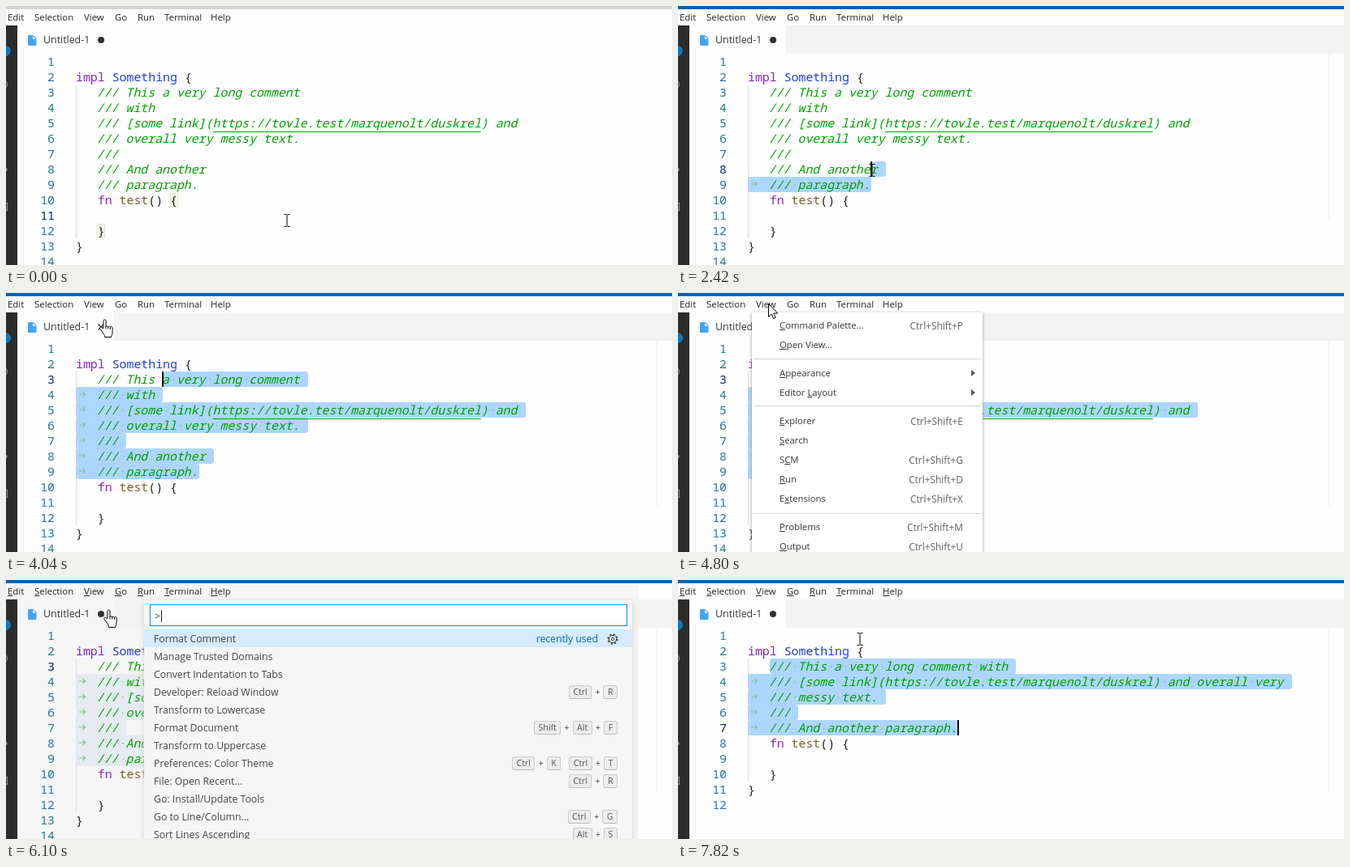
An HTML page for the animation above (8000 ms loop, 820 px wide and 320 px high).

```html
<!DOCTYPE html>
<html lang="en">
<head>
<meta charset="utf-8">
<title>Reflowing a comment</title>
<style>
html, body { margin: 0; width: 820px; height: 320px; overflow: hidden; background: #fefefe; }
body { position: relative; font: 12.25px/22px "Open Sans", "Noto Sans", sans-serif; color: #333; }
div, svg { position: absolute; }
div { white-space: pre; box-sizing: border-box; }
u { text-decoration: none; }

#title { width: 820px; height: 4px; background: #0063b1; }
.idle #title { background: #d4d4d4; }
#shade { top: 4px; width: 779px; height: 316px; background: #f6f6f6; }
#bar { top: 4px; font-size: 11.4px; line-height: 20px; color: #222; }
.alt #bar u, #menu u { text-decoration: underline; text-underline-offset: 1px; }
#lit { left: 90px; top: 4px; width: 38px; height: 19px; background: #e5e5e5; }
#side { left: 0; top: 24px; }
#strip { left: 133px; top: 24px; width: 687px; height: 35px; background: #f3f3f3; }
.idle #strip, .idle #ruler { display: none; }
#tab { left: 46px; top: 25px; line-height: 34px; font-size: 12.4px; }
#icons { left: 0; top: 24px; }
#cross, .close #dot { display: none; }
.close #cross { display: inline; }
#ruler { left: 801px; top: 59px; width: 1px; height: 205px; background: #f0f0f0; }

#code, #code div { font: 14.88px/19px "Noto Sans Mono", "DejaVu Sans Mono", monospace; }
#code { left: 86px; top: 59px; color: #222; }
#code .num { left: -76px; width: 50px; text-align: right; color: #237893; }
#code .now { color: #0b216f; }
#code .sel { height: 19px; border-radius: 3px; background: #add6ff; color: #8fc78f; }
.palette #code .sel { background: #e5ebf1; }
#code .sel svg { left: 4px; top: 5px; fill: none; stroke: #80c888; stroke-width: 1.2; }
#code .guide { left: 0; top: 38px; width: 1px; background: #dcdcdc; }
.pair { width: 10px; height: 18px; border: 1px solid #e2e5cf; background: #f5f8ea; display: none; }
.idle .pair { display: block; }
#code .cursor { width: 2px; height: 19px; background: #000; display: none; }
.caret #code .cursor { display: block; }
i { color: #00a000; position: relative; left: -1px; }
i u { text-decoration: underline 1px; text-underline-offset: 5px; text-decoration-skip-ink: none; }
.kw { color: #8424bd; }
.type { color: #1f3fd0; }
.fn { color: #795e26; }

#menu, #palette, #lit, #shade { display: none; }
.menu #menu, .palette #palette, .palette #shade, .lit #lit { display: block; }
#menu { left: 91px; top: 24px; width: 284px; height: 310px; background: #fff; box-shadow: 0 1px 4px #999; font-size: 11.3px; line-height: 24px; }
#menu .item { width: 283px; height: 24px; padding-left: 34px; }
#menu .key { right: 23px; top: 0; font-size: 11.9px; color: #606060; }
#menu .more { right: 8px; top: 8px; border: solid transparent; border-width: 4px 0 4px 5px; border-left-color: #555; }
#menu .rule { left: 2px; width: 280px; height: 1px; background: #d4d4d4; }
.item1 #menu .item:first-child, .item1 #menu .item:first-child .key { background: #0074e8; color: #fff; }

#palette { left: 170px; top: 25px; width: 601px; height: 310px; background: #f6f6f6; box-shadow: 0 1px 7px #d2d2d2; color: #444; }
#field { left: 7px; top: 5px; width: 588px; height: 27px; border: 1px solid #0090f1; background: #fff; padding-left: 5px; line-height: 27px; }
.blur #field { border-color: #fff; }
#blink { left: 13px; top: 6px; width: 1px; height: 15px; background: #222; display: none; }
.type-on #blink { display: block; }
.row { width: 601px; height: 22px; padding-left: 12px; line-height: 24px; }
.row.first { background: #d6ebff; }
.recent { right: 42px; top: 0; color: #0062b8; }
.keys { right: 18px; top: 2px; display: flex; align-items: center; height: 18px; font-size: 11px; line-height: 20px; }
kbd { font: 10.6px/15px "Open Sans", "Noto Sans", sans-serif; min-width: 6px; padding: 0 4.5px; text-align: center; border: 1px solid #ccc; border-bottom-color: #bbb; border-radius: 3px; background: #ececec; color: #555; }
.plus { margin: 0 4px; }
.gap { width: 10px; }
#gear { left: 570px; top: 41px; }

#pointer { left: 0; top: 0; pointer-events: none; }
#shape { fill: #fff; stroke: #000; }
</style>
</head>
<body>
<div id="shade"></div>
<div id="title"></div>
<div id="lit"></div>
<div id="bar"></div>
<svg id="side" width="14" height="296">
  <path fill="#2c2c2c" d="M0 0h14v296H0z"/>
  <path fill="#5a2a2a" d="M0 14h1v8H0z"/>
  <circle cx="-.5" cy="31.500" r="6.500" fill="#007acc"/>
  <g fill="none" stroke="#858585" stroke-width="1.3"><circle cx="-3" cy="73" r="4.600"/><path d="M-1 175l2.500 3-2.500 3M-3 219.500h4.500v9H-3"/></g>
</svg>
<div id="strip"></div>
<div id="tab">Untitled-1</div>
<svg id="icons" width="133" height="35">
  <path transform="translate(27 12)" fill="#42a5f5" d="M0 1.200Q0 0 1.200 0H6.500l4 4v7.800q0 1.200-1.200 1.200H1.200Q0 13 0 11.800z"/>
  <path fill="#fff" d="M33 13v3.700h3.700z"/>
  <circle id="dot" cx="117" cy="18" r="4" fill="#333"/>
  <path id="cross" d="M113.500 14.500l7 7m0-7l-7 7" stroke="#333" stroke-width="1.2"/>
</svg>
<div id="ruler"></div>
<div class="pair" style="left:202px;top:231px"></div>
<div class="pair" style="left:112px;top:269px"></div>
<div id="code"></div>
<div id="menu"></div>
<div id="palette">
  <div id="field">&gt;<div id="blink"></div></div>
</div>
<svg id="pointer" width="820" height="320"><path id="shape"/></svg>

<script>
const $ = id => document.getElementById(id);
const CHAR = 8.928, LINE = 19, LOOP = 8000;
const box = (cls, x, y, body = '', extra = '') =>
  `<div class="${cls}" style="left:${x}px;top:${y}px;${extra}">${body}</div>`;
const mnemonic = s => s.replace(/&(.)/, '<u>$1</u>');

// Menu bar
$('bar').innerHTML = [['&Edit', 2], ['&Selection', 35], ['&View', 96], ['&Go', 134],
  ['&Run', 162], ['&Terminal', 195], ['&Help', 252]]
  .map(([name, x]) => box('', x, 0, mnemonic(name))).join('');

// View menu: label, centre line, shortcut
$('menu').innerHTML = [['&Command Palette...', 40, 'Ctrl+Shift+P'], ['&Open View...', 64],
  ['&Appearance', 99, '>'], ['Editor &Layout', 123, '>'], ['&Explorer', 158, 'Ctrl+Shift+E'],
  ['&Search', 182], ['S&CM', 206, 'Ctrl+Shift+G'], ['&Run', 230, 'Ctrl+Shift+D'],
  ['E&xtensions', 254, 'Ctrl+Shift+X'], ['&Problems', 289, 'Ctrl+Shift+M'], ['&Output', 313, 'Ctrl+Shift+U']]
  .map(([name, y, key]) => box('item', 0, y - 36, mnemonic(name) +
    (key === '>' ? '<div class="more"></div>' : key ? `<div class="key">${key}</div>` : ''))).join('') +
  [81, 139, 272].map(y => `<div class="rule" style="top:${y - 24}px"></div>`).join('');

// Command palette
const chord = keys => keys.split('+').map(k => `<kbd>${k}</kbd>`).join('<span class="plus">+</span>');
const commands = ['Format Comment', 'Manage Trusted Domains', 'Convert Indentation to Tabs',
  'Developer: Reload Window|Ctrl+R', 'Transform to Lowercase', 'Format Document|Shift+Alt+F',
  'Transform to Uppercase', 'Preferences: Color Theme|Ctrl+K Ctrl+T', 'File: Open Recent...|Ctrl+R',
  'Go: Install/Update Tools', 'Go to Line/Column...|Ctrl+G', 'Sort Lines Ascending|Alt+S'];
$('palette').innerHTML += commands.map((c, i) => {
  const [name, keys] = c.split('|');
  const hint = i ? '' : '<div class="recent">recently used</div>';
  const chords = keys ? keys.split(' ').map(chord).join('<span class="gap"></span>') : '';
  return box(i ? 'row' : 'row first', 0, 36 + 22 * i, name + hint + `<div class="keys">${chords}</div>`);
}).join('') + `<svg id="gear" width="14" height="14" fill="none" stroke="#444">
  <circle cx="7" cy="7" r="4.600"/><circle cx="7" cy="7" r="1.700"/>
  <circle cx="7" cy="7" r="5.800" stroke-width="1.8" stroke-dasharray="2.200 2.355"/></svg>`;

// Editor text before and after reflowing
const url = 'https://tovle.test/marquenolt/duskrel';
const page = comment => ['', 'impl Something {', ...comment.map(s => '   /// '.slice(0, s ? 7 : 6) + s),
  '   fn test() {', '', '   }', '}', ''];
const docs = [
  page(['This a very long comment', 'with', `[some link](${url}) and`,
    'overall very messy text.', '', 'And another', 'paragraph.']),
  page(['This a very long comment with', `[some link](${url}) and overall very`,
    'messy text.', '', 'And another paragraph.'])
];
const paint = (s, doc) => s.includes('///')
  ? `<i>${doc ? s : s.replace(url, '<u>$&</u>')}</i>`
  : s.replace(/impl|fn/, '<span class="kw">$&</span>')
     .replace('Something', '<span class="type">$&</span>')
     .replace('test', '<span class="fn">$&</span>');

const tabMark = '<svg width="9" height="8"><path d="M0 4h7.500M4.500 1l3 3-3 3"/></svg>';

function selection(lines, [l1, c1], [l2, c2]) {
  let out = '';
  for (let l = l1; l <= l2; l++) {
    const text = lines[l - 1];
    const from = l === l1 ? c1 : 0, to = l === l2 ? c2 : text.length + 1;
    const dots = [...text].map((c, i) => c === ' ' && i > 2 ? '·' : ' ').join('').slice(from, to);
    out += box('sel', from * CHAR, (l - 1) * LINE, dots + (from ? '' : tabMark), `width:${(to - from) * CHAR}px`);
  }
  return out;
}

function drawCode({ doc, cur, anchor }) {
  const lines = docs[doc];
  let html = `<div class="guide" style="height:${(lines.length - 4) * LINE}px"></div>`;
  if (anchor) {
    const ends = [cur, anchor].sort((a, b) => a[0] - b[0] || a[1] - b[1]);
    html += selection(lines, ...ends);
  }
  lines.forEach((s, i) => {
    const y = i * LINE;
    html += `<div class="num${i + 1 === cur[0] ? ' now' : ''}" style="top:${y}px">${i + 1}</div>`;
    html += box('', 0, y, paint(s, doc));
  });
  $('code').innerHTML = html + box('cursor', cur[1] * CHAR - 1, (cur[0] - 1) * LINE);
}

// Mouse pointers: outline and hotspot
const pointers = {
  beam: ['M0 .5h3M4 .5h3M0 15.500h3M4 15.500h3M3.500 1v14', 3.5, 8],
  arrow: ['M.5 .5v16l3.700-3.500 2.500 5.500 2.400-1.100-2.400-5.400h5z', 0, 0],
  hand: ['M6.500 1c-1 0-1.600.7-1.600 1.600V12L3.200 10.600c-.9-.8-2.300-.4-2.500.7q0 .6.4 1.200l4.300 6.200c.8 1.200 1.200 2 1.200 3.800h8' +
    'c0-2 1.500-3 1.500-6v-5.500c0-1.700-2.600-1.900-2.700-.3 0-1.800-2.600-2-2.700-.4 0-1.800-2.600-2-2.700-.4V2.600C8 1.700 7.500 1 6.500 1z' +
    'M8 10v2.500M10.700 10.300v2.200M13.400 11v2', 6, 1]
};

// Time, pointer, x, y, then whatever else changes
const steps = [
  [0, 'beam', 346, 265, { look: 'idle', doc: 0, cur: [11, 0], anchor: null }],
  [1130, 'beam', 338, 262],
  [1250, 'beam', 325, 252],
  [1370, 'beam', 310, 240],
  [1490, 'beam', 298, 230],
  [1610, 'beam', 291, 225],
  [1880, 'beam', 290, 225],
  [2180, 'beam', 256, 222, { look: 'caret', cur: [9, 17], anchor: [9, 17] }],
  [2300, 'beam', 246, 217],
  [2420, 'beam', 239, 203, { cur: [8, 17] }],
  [2540, 'beam', 234, 183, { cur: [7, 6] }],
  [2690, 'beam', 228, 164, { cur: [6, 16] }],
  [2830, 'beam', 218, 141, { cur: [5, 15] }],
  [2960, 'beam', 205, 124, { cur: [4, 11] }],
  [3080, 'beam', 196, 109, { cur: [3, 12] }],
  [3620, 'beam', 182, 90, { look: '' }],
  [3740, 'beam', 165, 70],
  [3890, 'arrow', 133, 39],
  [4040, 'hand', 121, 33, { look: 'caret close' }],
  [4160, 'hand', 118, 28, { look: 'caret' }],
  [4290, 'arrow', 115, 20],
  [4410, 'arrow', 112, 15],
  [4530, 'arrow', 111, 13, { look: '' }],
  [4800, 'arrow', 111, 13, { look: 'menu' }],
  [4950, 'arrow', 111, 13, { look: 'menu lit' }],
  [5240, 'arrow', 111, 14],
  [5380, 'arrow', 117, 27],
  [5520, 'arrow', 118, 36, { look: 'menu lit item1' }],
  [6100, 'hand', 126, 37, { look: 'alt palette type-on' }],
  [6370, 'arrow', 140, 41],
  [6490, 'arrow', 155, 41],
  [6610, 'arrow', 169, 42, { look: 'alt palette' }],
  [6740, 'beam', 181, 50],
  [6860, 'beam', 189, 52],
  [7010, 'arrow', 194, 60, { look: 'alt palette type-on' }],
  [7140, 'hand', 203, 70],
  [7290, 'hand', 214, 72],
  [7420, 'hand', 224, 73, { look: 'alt palette' }],
  [7680, 'hand', 224, 73, { look: 'alt palette blur' }],
  [7820, 'beam', 224, 73, { look: 'alt caret', doc: 1, cur: [7, 29], anchor: [3, 3] }]
];

let shown = -1;
function show(index) {
  const state = Object.assign({}, ...steps.slice(0, index + 1).map(s => s[4]));
  const [, kind, x, y] = steps[index];
  const [path, dx, dy] = pointers[kind];
  document.body.className = state.look;
  drawCode(state);
  $('shape').setAttribute('d', path);
  $('shape').setAttribute('transform', `translate(${x - dx} ${y - dy})`);
}

const start = performance.now();
function tick() {
  const t = (performance.now() - start) % LOOP;
  const index = steps.filter(s => s[0] <= t).length - 1;
  if (index !== shown) show(shown = index);
  requestAnimationFrame(tick);
}
tick();
</script>
</body>
</html>
```
